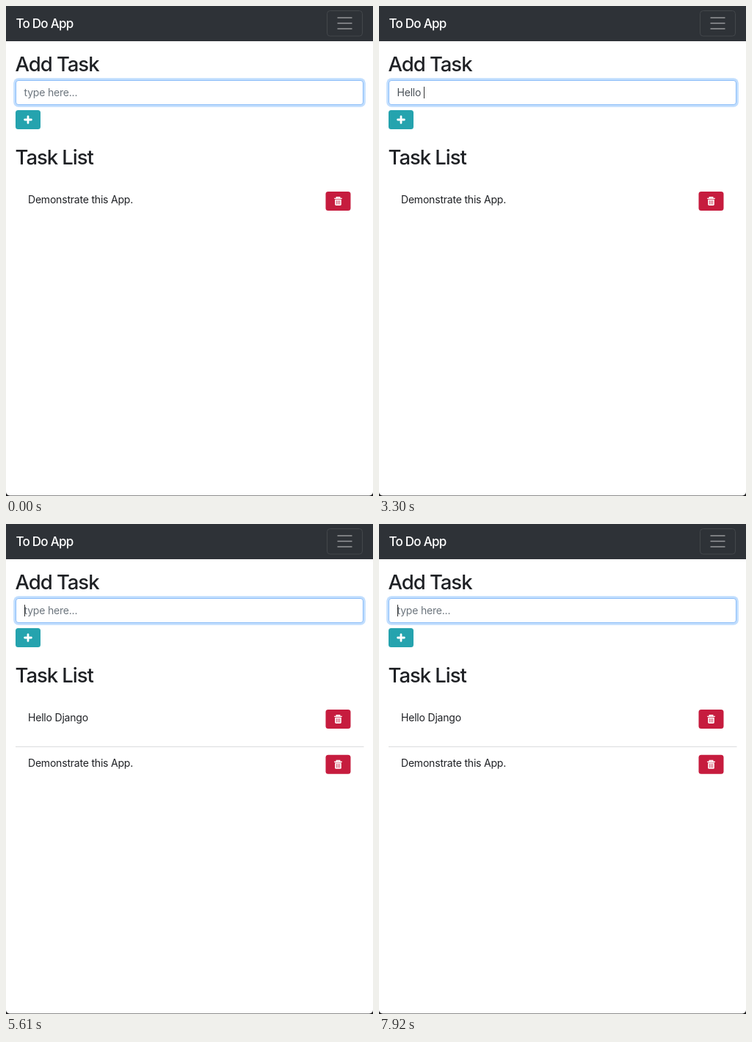
Recreate the animation shown at these times as an HTML page. Size 500 by 668 pixels, loop 8000 ms.

```html
<!DOCTYPE html>
<html lang="en">
<head>
<meta charset="utf-8">
<title>To Do App</title>
<style>
  html, body { margin: 0; width: 100%; height: 100%; overflow: hidden; background: #fff; }
  body { position: relative; font: 14px Inter, "Open Sans", sans-serif; font-optical-sizing: none; letter-spacing: -.2px; }
  svg { position: absolute; left: 0; top: 0; display: block; }
  text { fill: #1f2125; }
  .brand { font-size: 17px; font-weight: 500; letter-spacing: -.75px; fill: #fff; }
  .heading { font-size: 27.5px; font-weight: 500; letter-spacing: -1.05px; }
  #field {
    position: absolute; left: 13px; top: 101px; width: 474px; height: 34px;
    box-sizing: border-box; padding-left: 10.5px; line-height: 32px; white-space: pre;
    background: #fff; border: 1px solid #cbced2; border-radius: 4px; color: #495057;
  }
  #field.focused { border-color: #8abcf8; box-shadow: 0 0 0 2.8px #c1defe; }
  #field.empty { color: #6c757d; }
  #rest.selected { background: #b2d4fb; }
  #caret { position: absolute; top: 8px; width: 1px; height: 16px; background: #333; }
</style>
</head>
<body>
<svg width="500" height="668" viewBox="0 0 500 668">
  <defs>
    <g id="trash">
      <rect x="435.5" y="253" width="34" height="26" rx="3.5" fill="#c61c3e"/>
      <path d="M450.3 262V260.7H454.7V262M447.2 262.4H457.8" fill="none" stroke="#fff" stroke-width="1.4"/>
      <path d="M448.2 263.8H456.8V270.6Q456.8 272 455.4 272H449.6Q448.2 272 448.2 270.6Z" fill="#fff"/>
      <path d="M450.4 265V270.6M452.5 265V270.6M454.6 265V270.6" stroke="#c61c3e" stroke-width=".8"/>
    </g>
  </defs>

  <rect width="500" height="668" fill="#1d1d1f"/>
  <rect y="-10" width="500" height="677.4" rx="5" fill="#fff"/>

  <rect width="500" height="48" fill="#2e3237"/>
  <text class="brand" x="13.5" y="29.8">To Do App</text>
  <rect x="437.5" y="6.5" width="48" height="34.5" rx="4" fill="none" stroke="#43474b"/>
  <path d="M451.5 16H471.5M451.5 23.5H471.5M451.5 31H471.5" stroke="#96989b" stroke-width="1.5"/>

  <text class="heading" x="12.5" y="88.6">Add Task</text>
  <rect x="13" y="142" width="34" height="26" rx="3.5" fill="#25a3ae"/>
  <path d="M30 150.6V159.4M25.6 155H34.4" stroke="#fff" stroke-width="2.8" stroke-linecap="round"/>
  <text class="heading" x="12.5" y="215.6">Task List</text>

  <g id="added">
    <text x="30" y="269">Hello Django</text>
    <use href="#trash"/>
    <path d="M13 303.7H487.5" stroke="#d9dadc"/>
  </g>
  <g id="first">
    <text x="30" y="269">Demonstrate this App.</text>
    <use href="#trash"/>
  </g>
</svg>
<div id="field"><span id="typed"></span><i id="caret"></i><span id="rest"></span></div>

<script>
const LOOP = 8000, SUBMIT = 4620, REFOCUS = 5610, BLINK = 1060;
const PLACEHOLDER = 'type here...', SUGGESTION = 'Hello ';

// [start time, typed text]; a partial first word is completed by the selected suggestion
const typing = [
  [0, ''], [1980, 'H'], [2310, 'Hel'], [2640, 'Hell'], [2970, 'Hello '],
  [3630, 'Hello D'], [3960, 'Hello Djan'], [4290, 'Hello Django'], [SUBMIT, '']
];

const byId = id => document.getElementById(id);
const field = byId('field'), typed = byId('typed'), rest = byId('rest'), caret = byId('caret');

const blinkOn = (t, start) => t >= start && (t - start) % BLINK < BLINK / 2;

function render(t) {
  const value = typing.filter(([start]) => t >= start).pop()[1];
  const empty = value === '';
  const submitted = t >= SUBMIT;
  const focused = !submitted || t >= REFOCUS;
  const selected = !empty && value.length < SUGGESTION.length;
  const blink = blinkOn(t, submitted ? 5500 : 530);

  field.className = (focused ? 'focused ' : '') + (empty ? 'empty' : '');
  typed.textContent = value;
  rest.textContent = empty ? PLACEHOLDER : SUGGESTION.slice(value.length);
  rest.className = selected ? 'selected' : '';
  caret.hidden = !focused || selected || (empty && !blink);
  caret.style.display = caret.hidden ? 'none' : '';

  byId('added').style.display = submitted ? '' : 'none';
  byId('first').setAttribute('transform', `translate(0 ${submitted ? 61.8 : 0})`);
}

const begin = performance.now();
function tick() {
  render((performance.now() - begin) % LOOP);
  requestAnimationFrame(tick);
}
tick();
</script>
</body>
</html>
```
